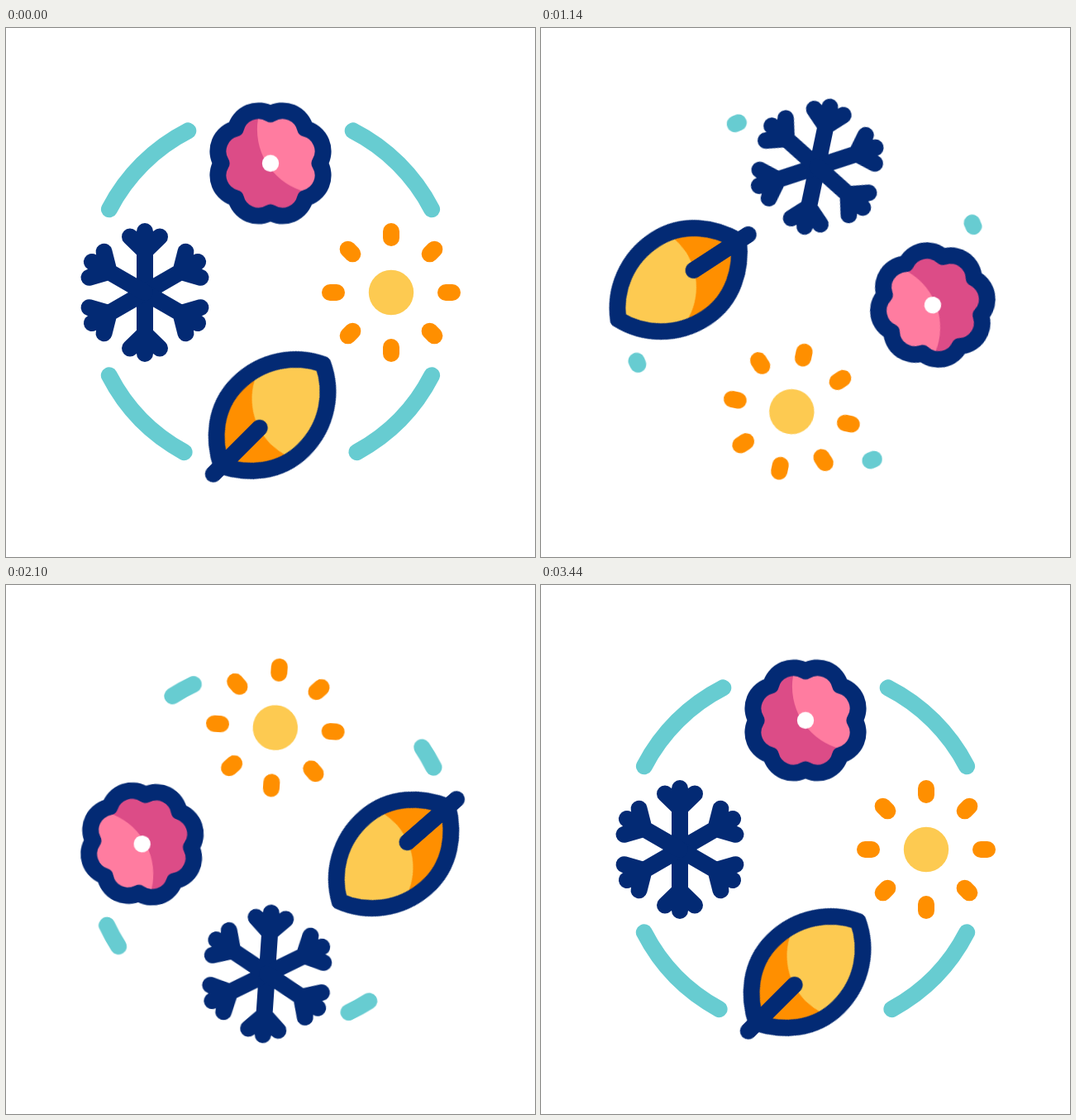
An HTML page that plays this animation: 640 by 640 pixels, repeating every 3.6 s.

```html
<!DOCTYPE html>
<html lang="en">
<head>
<meta charset="utf-8">
<title>Four seasons</title>
<style>
  html, body {
    margin: 0;
    width: 100%;
    height: 100%;
    overflow: hidden;
    background: #fff;
  }

  svg {
    display: block;
    width: 100vw;
    height: 100vh;
  }

  .line {
    fill: none;
    stroke: #032a74;
    stroke-width: 20;
    stroke-linecap: round;
    stroke-linejoin: round;
  }

  .arc { stroke: #67ccd1; }
  .ray { stroke: #ff8f00; }

  /* The ring and every season turn by the same angle, each about its own pivot. */
  .spin {
    transform-origin: 0 0;
    animation: spin 3600ms infinite;
  }

  .arc {
    stroke-dasharray: 100 101;
    animation: trim 3600ms infinite cubic-bezier(.333, 0, .667, 1);
  }

  @keyframes spin {
    0% { transform: rotate(0deg); animation-timing-function: cubic-bezier(.333, 0, .667, 1); }
    5.278% { transform: rotate(-5deg); animation-timing-function: cubic-bezier(.31, 0, .584, 1); }
    89.444% { transform: rotate(365deg); animation-timing-function: cubic-bezier(.333, 0, .667, 1); }
    95.556%, 100% { transform: rotate(360deg); }
  }

  /* Each arc is wiped away and redrawn twice per turn. */
  @keyframes trim {
    0%, 11.39% { stroke-dashoffset: 0; }
    34.44% { stroke-dashoffset: -100.5; }
    48.75% { stroke-dashoffset: -201; }
    62.5% { stroke-dashoffset: -301.5; }
    85.69%, 100% { stroke-dashoffset: -402; }
  }
</style>
</head>
<body>
<svg viewBox="0 0 640 640" aria-hidden="true">
  <defs>
    <path id="bloom" d="M0-59.5
      A28.3 28.3 0 0 1 42.1-42.1 A28.3 28.3 0 0 1 59.5 0
      A28.3 28.3 0 0 1 42.1 42.1 A28.3 28.3 0 0 1 0 59.5
      A28.3 28.3 0 0 1-42.1 42.1 A28.3 28.3 0 0 1-59.5 0
      A28.3 28.3 0 0 1-42.1-42.1 A28.3 28.3 0 0 1 0-59.5Z"/>
    <path id="blade" d="M0-90
      C32-75 56.5-42 56.5 0 C56.5 40 30 69 0 84
      C-30 69-56.5 40-56.5 0 C-56.5-42-32-75 0-90Z"/>
    <path id="arm" d="M0 0V-74 M-18-67.5 0-50 18-67.5"/>
    <path id="ray" d="M0-66V-74"/>
    <clipPath id="inBloom"><use href="#bloom"/></clipPath>
    <clipPath id="inBlade"><use href="#blade"/></clipPath>
  </defs>

  <!-- the pivot sits slightly above the middle of the ring -->
  <g transform="translate(319.7 318.8)">
    <g class="spin">
      <g transform="translate(.3 1.2)">
        <path class="line arc" pathLength="100" d="M-195.1-100.7A219.5 219.5 0 0 1-99.7-195.6"/>
        <path class="line arc" pathLength="100" d="M99.7-195.6A219.5 219.5 0 0 1 195.1-100.7"/>
        <path class="line arc" pathLength="100" d="M195.2 100.3A219.5 219.5 0 0 1 104.4 193.1"/>
        <path class="line arc" pathLength="100" d="M-104.4 193.1A219.5 219.5 0 0 1-195.2 100.3"/>

        <!-- spring -->
        <g transform="translate(0 -156.3)">
          <g class="spin">
            <use href="#bloom" fill="#dc4c87"/>
            <path clip-path="url(#inBloom)" fill="#ff7ca0"
              d="M-15-54A78 78 0 0 0 37 33L70 45V-75H-15Z"/>
            <use href="#bloom" class="line"/>
            <circle r="10.2" fill="#fff"/>
          </g>
        </g>

        <!-- summer -->
        <g transform="translate(146 0)">
          <g class="spin">
            <circle r="27.2" fill="#fdca51"/>
            <g class="line ray">
              <use href="#ray"/>
              <use href="#ray" transform="rotate(45)"/>
              <use href="#ray" transform="rotate(90)"/>
              <use href="#ray" transform="rotate(135)"/>
              <use href="#ray" transform="rotate(180)"/>
              <use href="#ray" transform="rotate(225)"/>
              <use href="#ray" transform="rotate(270)"/>
              <use href="#ray" transform="rotate(315)"/>
            </g>
          </g>
        </g>

        <!-- autumn -->
        <g transform="translate(0 150.5)">
          <g class="spin">
            <g transform="rotate(45)">
              <use href="#blade" fill="#ff8f00"/>
              <path clip-path="url(#inBlade)" fill="#fdca51"
                d="M-70-18H-45A77 77 0 0 0 45 20H70V-100H-70Z"/>
              <use href="#blade" class="line"/>
              <path class="line" d="M0 18.7V98"/>
            </g>
          </g>
        </g>

        <!-- winter -->
        <g transform="translate(-152 0)">
          <g class="spin line">
            <use href="#arm"/>
            <use href="#arm" transform="rotate(60)"/>
            <use href="#arm" transform="rotate(120)"/>
            <use href="#arm" transform="rotate(180)"/>
            <use href="#arm" transform="rotate(240)"/>
            <use href="#arm" transform="rotate(300)"/>
          </g>
        </g>
      </g>
    </g>
  </g>
</svg>
</body>
</html>
```
